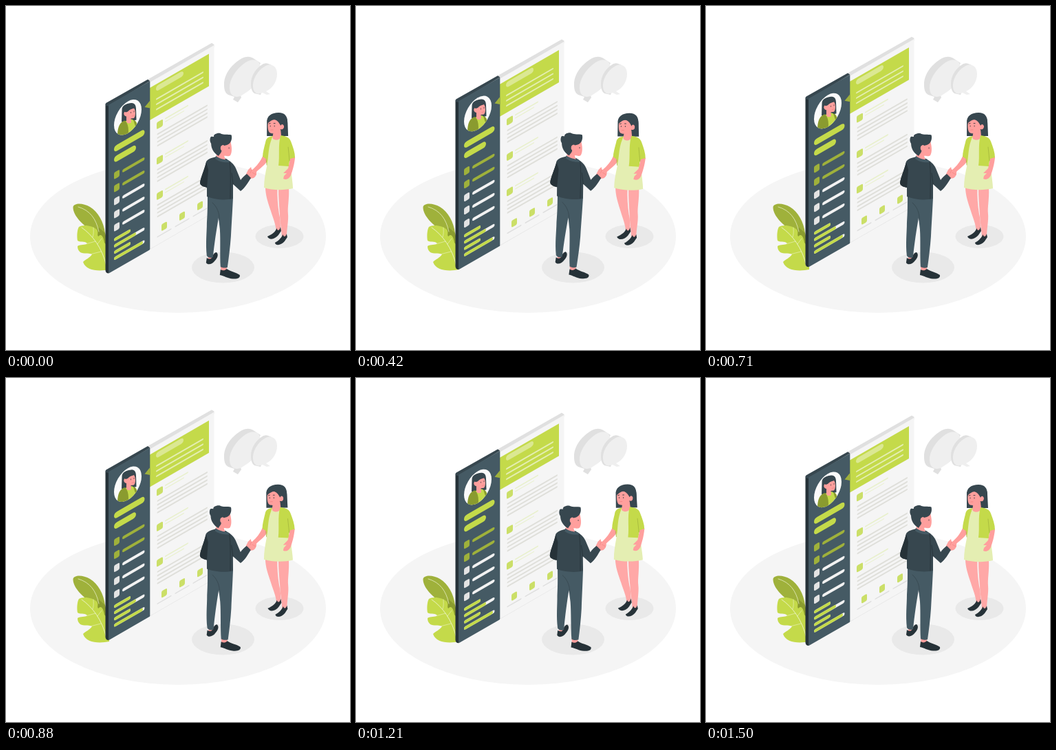
An HTML page with a canvas that plays this animation: 500x500 px, repeating every 1.54 s.

```html
<!DOCTYPE html>
<html lang="en">
<head>
<meta charset="utf-8">
<title>Job interview</title>
<style>
html, body { margin: 0; width: 100%; height: 100%; overflow: hidden; background: #fff; }
canvas { display: block; width: 100vw; height: 100vh; }
</style>
</head>
<body>
<canvas></canvas>
<script>
const canvas = document.querySelector('canvas');
const ctx = canvas.getContext('2d');
const scale = window.devicePixelRatio || 1;
canvas.width = canvas.height = 500 * scale;

const LOOP = 1540, STEPS = 37, SLOPE = 0.577;
const LIME = '#c4da4a', OLIVE = '#9fb13b', MOSS = '#8a9b2f', PALE = '#e4eeb2';
const SLATE = '#455a64', NAVY = '#37474f', INK = '#263238';
const SKIN = '#ff9f9d', LEG = '#ffa8a7', BLUSH = '#f28583';
const FLOOR = '#f5f5f5', SHADOW = '#e9e9e9', RIM = '#e0e0e0';

function shape(color, d) {
  ctx.fillStyle = color;
  ctx.fill(new Path2D(d));
}

function stroke(color, width, d) {
  ctx.strokeStyle = color;
  ctx.lineWidth = width;
  ctx.lineCap = ctx.lineJoin = 'round';
  ctx.stroke(new Path2D(d));
}

function ellipse(color, x, y, rx, ry, turn = 0) {
  ctx.fillStyle = color;
  ctx.beginPath();
  ctx.ellipse(x, y, rx, ry, turn, 0, Math.PI * 2);
  ctx.fill();
}

function box(color, x0, x1, mid, height, radius = 2) {
  ctx.fillStyle = color;
  ctx.beginPath();
  ctx.roundRect(x0, mid - height / 2, x1 - x0, height, radius);
  ctx.fill();
}

const pill = (color, x0, x1, mid, height) => box(color, x0, x1, mid, height, height / 2);

// Draws on the wall plane: x stays, y rises to the right of x = 210.
function onWall(draw) {
  ctx.save();
  ctx.transform(1, -SLOPE, 0, 1, 0, 210 * SLOPE);
  draw();
  ctx.restore();
}

function floor() {
  ellipse(FLOOR, 250, 335, 215, 111);
  ellipse(SHADOW, 315.5, 380, 45.5, 22.5);
  ellipse(SHADOW, 397.5, 335, 35, 17);
}

function bubbles() {
  shape(RIM, 'M317 114C317 98 329 84 343 76C351 72 357 74 361 77L370 83L341 130L342 133L337 140L330 136L332 132L323 129C318 126 317 121 317 114Z');
  shape('#efefef', 'M325 119C325 104 337 89 350 81C361 75 370 79 370 91C370 106 360 120 347 127L341 131L336 132C329 132 325 127 325 119Z');
  shape(RIM, 'M356 113C356 100 365 89 374 84C379 82 382 84 386 86L370 129L361 127C357 124 356 119 356 113Z');
  shape('#efefef', 'M359 116C359 103 369 90 380 86C388 84 394 89 394 99C394 110 387 120 378 124L384 128L379 129L373 126C364 130 359 125 359 116Z');
}

function plant() {
  shape(OLIVE, 'M97.5 292C99 286 112 286 122 292C134 299 142 314 144 330L148 350L140 350C137 338 131 332 122 325C109 316 97 303 97.5 292Z');
  shape(MOSS, 'M131 331L135 322L144 330L148 350H140C138 342 135 336 131 331Z');
  stroke('#e6eec0', .8, 'M105 292C122 297 131 309 135 328');
  shape(LIME, 'M106 321C112 317 126 319 132 325C135 329 132 332 134 335C139 329 142 337 143 344L150 352V383C135 386 116 385 112 372C116 368 122 366 125 361C119 358 113 361 108 358C105 355 104 353 104 349C109 346 115 348 118 345C114 341 107 344 104 341C103 336 103 326 106 321Z');
  stroke('#f4f8df', .8, 'M110 322C126 333 140 352 146 378');
  stroke('#f4f8df', .5, 'M126 336C128 330 127 326 127 322M133 346L139 338M116 346L130 342M122 361L138 357');
}

function portrait() {
  ctx.save();
  ctx.beginPath();
  onWall(() => ctx.ellipse(177, 143.3, 20, 23.1, 0, 0, Math.PI * 2));
  ctx.fillStyle = '#fafafa';
  ctx.fill();
  ctx.clip();
  shape(NAVY, 'M168.5 152C168 144 177 142 182 141.5C187 141 189 145 189 150L189.5 166L182 168L168 169Z');
  shape(LIME, 'M173 168L183 165L190 170V192H173Z');
  shape(SKIN, 'M175 153L186 149C189 153 188.5 161 186 163.5L181.5 164L182 170C179 172 176 171 175 169V161C170 160 170 154 175 153Z');
  shape(NAVY, 'M169 152L174 144C181 141 187 143 188 149C184 148 180 151 177 154L174 155Z');
  shape(MOSS, 'M162 190C162 177 165 169 173 167C178 172 179 180 177 192ZM185 166C189 167 190 169 190 175V181C188 174 186 170 185 166Z');
  stroke(INK, .7, 'M181.5 155V156M186 153.5V154.5');
  stroke(BLUSH, .8, 'M183 160.5L186 159.5');
  ctx.restore();
}

function sidebar() {
  shape(INK, 'M144.5 145L149 143V389C146 389 144.5 387 144.5 384Z');
  shape(NAVY, 'M144.5 145C144 142 146 141 148 140L206 107.2L209.3 109.5L149 146Z');
  onWall(() => {
    box(SLATE, 149, 209.3, 231.7, 245, 1);
    pill(LIME, 157, 201.5, 178.6, 9);
    pill(LIME, 157, 189, 193.8, 9);
    for (let i = 0; i < 5; i++) {
      const y = 217.2 + i * 19;
      box(i < 2 ? OLIVE : '#e3e3e3', 157, 165, y, 10);
      pill(i < 2 ? OLIVE : '#f2f2f2', 169, 201.5, y, 4.5);
    }
    // Skill bars: how far each one is filled and how long it is.
    [[181, 181], [189, 201.5], [181, 181], [199, 201.5]].forEach(([filled, end], i) => {
      const y = 310 + i * 9.2;
      pill('#f2f2f2', 157, end, y, 4.5);
      pill(LIME, 157, filled, y, 4.5);
    });
  });
  portrait();
}

function resume() {
  const mark = '#cbdf68';
  shape(RIM, 'M206 107.2L299 54.4L302.5 56.5V60L209 112Z');
  onWall(() => {
    box(FLOOR, 209, 302.5, 232.5, 243, 0);
    box('#e6e6e6', 209, 302.5, 353.6, .8, 0);
    box(LIME, 209, 295, 142.5, 47, 0);
    pill('#dbe892', 218, 258, 125.8, 8);
    for (let i = 0; i < 3; i++) {
      pill(PALE, 218, 287, 141 + i * 7.5, 2.2);
      const y = 180.2 + i * 51.5;
      box(mark, 219, 228, y, 10);
      pill('#e8f0cb', 231, 265, y - 3.5, 1.8);
      pill('#e8f0cb', 231, 259, y + 1, 1.2);
      for (let j = 0; j < 4; j++) pill('#dfdfda', 219.5, 293, y + 12.5 + j * 5.6, 2.2);
    }
    for (let x = 230; x < 290; x += 26) {
      box(mark, x - 4, x + 4, 332.3, 10);
      pill('#dedede', x - 10.5, x + 10.5, 342, 1.6);
    }
  });
}

function woman() {
  // Legs and shoes
  shape(LEG, 'M377 263H394.5C394 276 395 290 397 302C399 310 399 317 399 325L393 328C392 316 388 308 385 298C381 286 377 275 377 263Z');
  shape(LEG, 'M396 264H411C412 280 409 292 410 302C411 312 408 325 408 336L401 339C401 325 398 312 398 302C397 290 396 278 396 264Z');
  shape(INK, 'M380 335C387 332 392 328 393.5 323C395 328 398 326 399 321L400 327L396 333C391 339 383 341 380 335ZM391 344C397 341 401 336 402.5 332C404 337 407 335 408 331L409 336L405 342C400 348 392 349 391 344Z');
  // Back hair, reaching arm and dress
  shape(NAVY, 'M379 170C378 160 386 155 396 155C405 155 409 160 409 169L410 189H379Z');
  shape(SKIN, 'M374 216L381 223C377 231 369 236 364 241C364 247 361 251 356 249L354 245L358 238C364 233 370 226 374 216Z');
  shape(PALE, 'M382 193L402 191L411 232L414 236C415 247 417 258 417 265C405 268 387 268 375 264C375 253 377 243 379 233Z');
  shape(SKIN, 'M389 180H399L400 190C397 196 390 196 387 192Z');
  // Cardigan and hanging arm
  shape(LIME, 'M388 189C381 190 378 192 377 198C375 206 373 213 373 219L379 223L379 231C382 222 380 204 388 189Z');
  shape(LIME, 'M399 188C407 189 412 191 414 197C417 205 420 213 420 221L412 225L411 233L396 232C398 218 395 203 399 188Z');
  shape(SKIN, 'M413 222L420 220C419 231 416 240 414 246C411 252 407 253 403 251L404 247L408 243L403 243L410 236Z');
  stroke(OLIVE, .7, 'M410 205L412 225M378 223L379 231');
  // Face
  shape(SKIN, 'M381 167C386 163 394 164 399 171C401 169 405 171 404 175C404 179 401 180 399 179C397 184 388 187 383 184C380 181 380 173 381 167Z');
  shape(NAVY, 'M380 171C380 160 387 155 397 156C405 157 409 162 409 170V188L403 181L404 175C403 171 400 171 399 174C397 170 395 167 391 165C387 165 383 168 380 171Z');
  stroke(INK, .8, 'M382 171L384 170.5M389 170.5L391 170.5M384 174V175M390 174V175');
  stroke(BLUSH, .9, 'M385 180L388 180');
}

function man() {
  // Legs and shoes
  shape(SKIN, 'M294 361H301V370H294ZM312 378H321V388H313Z');
  shape(INK, 'M291 373L292 366C295 368 298 368 299 366C301 362 303 358 306 358C310 361 307 367 304 370C300 376 293 377 291 373Z');
  shape(INK, 'M312 383L311 391C317 392 322 396 330 396.5C337 397 341 395 340 391C335 387 326 386 321 382C318 385 315 385 312 383Z');
  shape(SLATE, 'M293 276L330 279C329 300 328 315 327 335C326 350 324 366 322 380C319 381 315 381 312 379C311 362 312 340 311 325L309 308C306 325 303 345 301 365C298 367 294 366 292 363C290 345 292 330 292 315C293 300 293 290 293 276Z');
  stroke(NAVY, .8, 'M310 311C311 301 306 291 300 286');
  // Hand, jacket and head
  shape(SKIN, 'M348 246L352 238L356 234L357 238L363 239C365 243 364 247 360 250L355 251Z');
  stroke(BLUSH, .7, 'M357 238L355 243M358 242L363 245');
  shape(NAVY, 'M305 219C300 221 295 221 291 226C288 239 283 249 282 257C282 261 287 263 292 264V277C302 281 318 283 330 280V259L341 269C348 264 352 256 356 250L350 244C346 247 343 250 341 253L334 236C331 229 326 226 320 222Z');
  shape(INK, 'M291 227L294 238L292 264C287 263 282 261 282 257C283 249 288 239 291 227Z');
  stroke(INK, .8, 'M330 259L328 243M325 226C327 240 326 263 326 280');
  shape(SKIN, 'M314 201L326 196C328 204 329 212 326 217C323 220 319 217 317 218L319 224C314 226 308 223 305 220L307 210Z');
  shape(SLATE, 'M305 218C310 222 317 223 323 224L325 227C317 228 309 226 304 222Z');
  shape(NAVY, 'M297 191C298 189 300 190 302 190C301 187 306 184.5 311 185C317 188 322 186 327.5 187.5C329 193 327 200 321 202L317 203C315 200 311 204 313 209C314 213 311 214 309 218C302 214 298 207 298 200C296 197 296 194 297 191Z');
  ellipse(SKIN, 314.5, 206.5, 2.8, 3.8);
  stroke(INK, .8, 'M324 206V207');
}

function draw(now) {
  const step = Math.floor((now % LOOP + 3) / LOOP * STEPS) % STEPS;
  const phase = (step + 1) / STEPS % 1;
  const lift = 10 * (1 - Math.abs(2 * phase - 1));
  // Triangle wave: 0, 1, 0, -1 at each quarter turn.
  const sway = Math.abs((phase * 4 + 3) % 4 - 2) - 1;

  ctx.setTransform(scale, 0, 0, scale, 0, 0);
  ctx.fillStyle = '#fff';
  ctx.fillRect(0, 0, 500, 500);
  floor();
  bubbles();
  plant();

  ctx.save();
  ctx.translate(0, -lift);
  resume();
  sidebar();
  shape(OLIVE, 'M201.5 147.5L209.3 138V149Z');
  ctx.restore();

  ctx.save();
  ctx.translate(351, 276);
  ctx.rotate(sway * Math.PI / 180);
  ctx.translate(-351, -276);
  woman();
  man();
  ctx.restore();
  requestAnimationFrame(draw);
}

requestAnimationFrame(draw);
</script>
</body>
</html>
```
